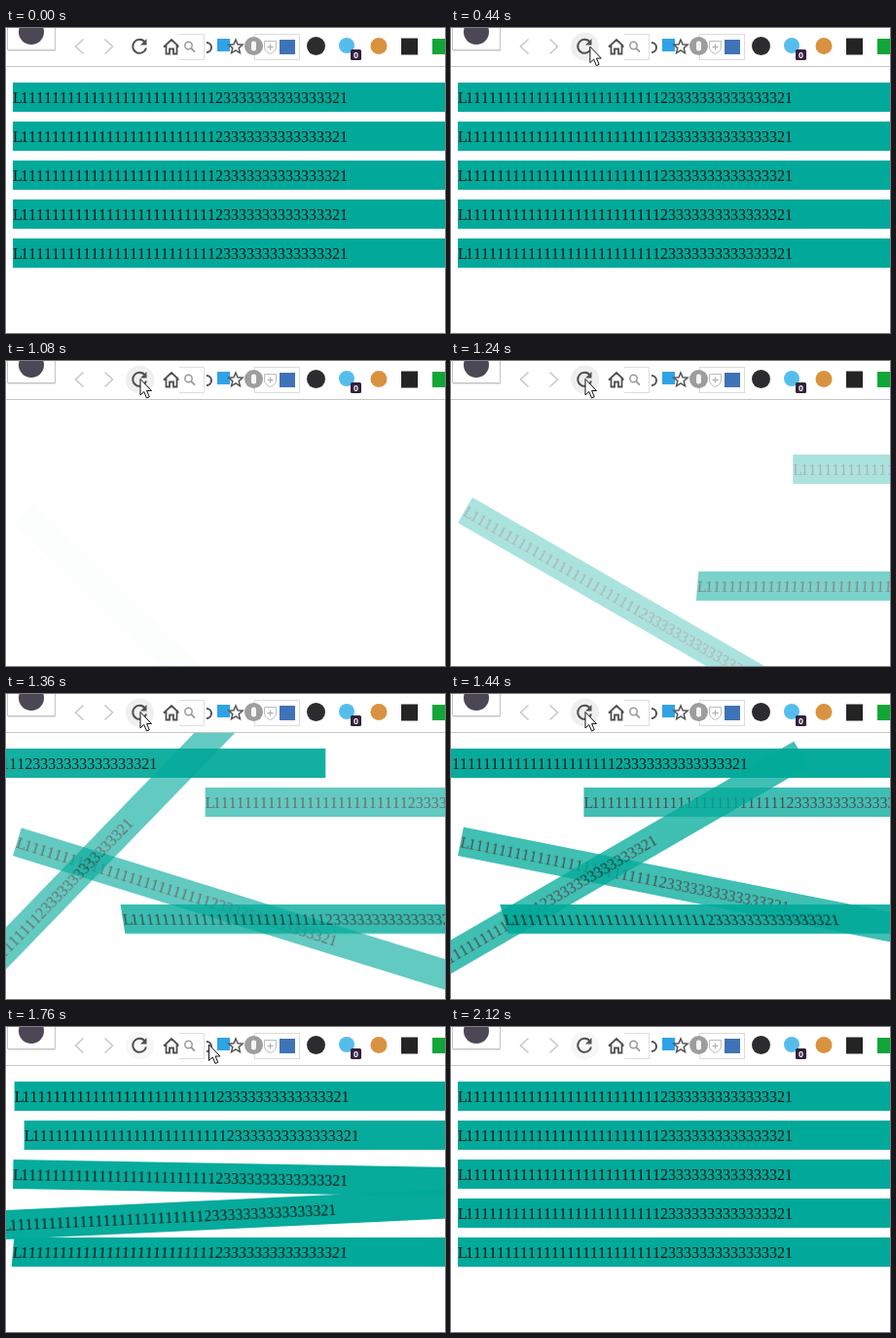
An HTML page for the animation above (2.36 s loop, 451 by 313 pixels).

```html
<!DOCTYPE html>
<html lang="en">
<head>
<meta charset="utf-8">
<title>Entrances</title>
<style>
  html, body { margin: 0; width: 100%; height: 100%; overflow: hidden; background: #fff; }
  #stage { position: relative; width: 451px; height: 313px; overflow: hidden; background: #fff; }
  #page { position: absolute; left: 0; top: 40px; width: 451px; height: 273px; overflow: hidden; }
  .bar {
    position: absolute; left: 7px; width: 517px; height: 30px;
    background: #00a99a; color: #0c1413; white-space: nowrap;
    font: 16px/32px "Liberation Serif", serif; font-kerning: none;
    outline: 1px solid transparent; /* smooth edges when turned */
  }
  .bar b { font-weight: normal; letter-spacing: -1.8px; }
  svg { position: absolute; left: 0; top: 0; }
</style>
</head>
<body>
<div id="stage">
  <div id="page"></div>
  <svg width="451" height="313" viewBox="0 0 451 313" fill="none">
    <path d="M0 39.5H451" stroke="#c6c6c6"/>
    <!-- picture card -->
    <path d="M1.5 0V22.5H50.5V0" fill="#fff" stroke="#c4c4c4"/>
    <path d="M2 23.5H51" stroke="#e2e2e2"/>
    <circle cx="26" cy="4" r="13" fill="#4b4754"/>
    <!-- navigation -->
    <circle id="hover" cx="137.500" cy="19" r="14.500"/>
    <g stroke="#c9c9c9" stroke-width="1.600">
      <path d="M79.500 11.500L71.500 19L79.500 26.500"/>
      <path d="M101.500 11.500L109.500 19L101.500 26.500"/>
    </g>
    <path d="M142.800 14.600A7 7 0 1 0 144 20.500" stroke="#505050" stroke-width="2"/>
    <path d="M144.500 11V17.500H138Z" fill="#505050"/>
    <path d="M162 19.500L170 12L178 19.500M164.500 18V26.500H168V21.500H172V26.500H175.500V18" stroke="#505050" stroke-width="1.800"/>
    <!-- search box -->
    <path d="M204 15A5 5 0 0 1 204 25" stroke="#505050" stroke-width="2" transform="translate(2 0)"/>
    <rect x="177.500" y="6.500" width="26" height="26" fill="#fff"/>
    <path d="M178 6.500H203.500V32.500H178" stroke="#dedede"/>
    <circle cx="187.500" cy="18" r="3.700" stroke="#999" stroke-width="1.500"/>
    <path d="M190.300 21L194 24.700" stroke="#999" stroke-width="1.800"/>
    <rect x="217" y="11" width="13" height="13" fill="#2fa3e6"/>
    <path id="star" stroke="#555" stroke-width="1.500" fill="#fff"/>
    <!-- extensions -->
    <rect x="255.500" y="6.500" width="46" height="26" fill="#fff" stroke="#dcdcdc"/>
    <circle cx="254.500" cy="18.500" r="9.500" fill="#9d9d9d"/>
    <rect x="252" y="13.500" width="5" height="10" rx="2" fill="#f4f4f4"/>
    <path d="M265.500 13.500H277.500V20Q277 24.500 271.500 26.500Q266 24.500 265.500 20Z" stroke="#bbb"/>
    <path d="M271.500 16.500V22.500M268.500 19.500H274.500" stroke="#b4b4b4" stroke-width="1.300"/>
    <rect x="281" y="12" width="16" height="15" fill="#3f73b8"/>
    <circle cx="318.500" cy="18.500" r="9.500" fill="#2c2c2e"/>
    <circle cx="350" cy="18" r="8" fill="#55bdec"/>
    <rect x="354" y="22" width="11" height="11" rx="1.500" fill="#34203f"/>
    <text x="359.500" y="31" fill="#fff" text-anchor="middle" font-family="Liberation Sans, sans-serif" font-size="9" font-weight="bold">0</text>
    <circle cx="383" cy="18.500" r="8.500" fill="#d9923f"/>
    <rect x="406" y="10.500" width="17" height="17" fill="#242424"/>
    <rect x="438" y="11" width="17" height="16" fill="#12a637"/>
    <path id="cursor" d="M0 0V16.500L3.800 13L6.500 19.500L9.300 18.300L6.600 12H11.500Z" fill="#fff" stroke="#111"/>
  </svg>
</div>
<script>
const LOOP = 2360, TICK = 40, LOADED = 1080;
const $ = id => document.getElementById(id);

// Five entrances, each one second long
const entrances = [
  { easing: 'cubic-bezier(.215,.61,.355,1)', frames: [
    [0, 'translate3d(-3000px,0,0)', 0], [.6, 'translate3d(25px,0,0)', 1],
    [.75, 'translate3d(-10px,0,0)', 1], [.9, 'translate3d(5px,0,0)', 1], [1, 'none', 1]] },
  { easing: 'ease', frames: [[0, 'translate3d(100%,0,0)', 0], [1, 'none', 1]] },
  { easing: 'ease', pivot: 'left bottom', frames: [[0, 'rotate(45deg)', 0], [1, 'rotate(0deg)', 1]] },
  { easing: 'ease', frames: [
    [0, 'translate(-100%,0) rotate(-120deg)', 0], [1, 'translate(0,0) rotate(0deg)', 1]] },
  { easing: 'ease-out', frames: [
    [0, 'translate3d(100%,0,0) skewX(-30deg)', 0], [.6, 'skewX(20deg)', 1],
    [.8, 'skewX(-5deg)', 1], [1, 'none', 1]] }
];

const label = '1'.repeat(25) + '2' + '3'.repeat(14) + '21';

const anims = entrances.map(({ easing, pivot, frames }, i) => {
  const bar = document.createElement('div');
  bar.className = 'bar';
  bar.style.top = 16 + i * 40 + 'px';
  if (pivot) bar.style.transformOrigin = pivot;
  bar.innerHTML = '<b>L</b>' + label;
  $('page').append(bar);
  const keys = frames.map(([offset, transform, opacity]) => ({ offset, transform, opacity, easing }));
  const anim = bar.animate(keys, { duration: 1000, fill: 'both' });
  anim.pause();
  return anim;
});

// Piecewise linear lookup in rows of [time, value]
function lerp(rows, t) {
  if (t <= rows[0][0]) return rows[0][1];
  for (let i = 1; i < rows.length; i++) {
    const [t0, a] = rows[i - 1], [t1, b] = rows[i];
    if (t <= t1) return a + (b - a) * (t - t0) / (t1 - t0);
  }
  return rows[rows.length - 1][1];
}

const progress = [[1060, 0], [1240, .217], [1440, .4515], [1600, .65], [1760, .807], [1980, 1]];

function cursorAt(t) {
  if (t < 40) return null;
  if (t < 1640) {
    const p = Math.min(1, (t - 20) / 480), k = (1 - p) ** 2;
    return [138 + 310 * k, 18.5 + 38 * k];
  }
  const p = (t - 1600) / 160;
  return p > 2.9 ? null : [138 + 70.5 * p ** 1.5, 18.5 - .5 * p];
}

function draw(t) {
  const p = t < LOADED ? 1 : lerp(progress, t);
  anims.forEach(a => { a.currentTime = p * 1000; });
  const pos = cursorAt(t);
  $('cursor').style.display = pos ? '' : 'none';
  if (pos) $('cursor').setAttribute('transform', `translate(${pos})`);
  $('hover').setAttribute('fill', t < 400 ? '#fff' : t < 1680 ? '#efefef' : '#f7f7f7');
}

$('star').setAttribute('d', 'M' + Array.from({ length: 10 }, (_, i) => {
  const r = i % 2 ? 3.4 : 7.5, a = i * Math.PI / 5;
  return (236 + r * Math.sin(a)).toFixed(1) + ' ' + (19.5 - r * Math.cos(a)).toFixed(1);
}).join('L') + 'Z');

const start = performance.now();
function loop() {
  const t = (performance.now() - start) % LOOP;
  draw(Math.floor(t / TICK) * TICK);
  requestAnimationFrame(loop);
}
loop();
</script>
</body>
</html>
```
